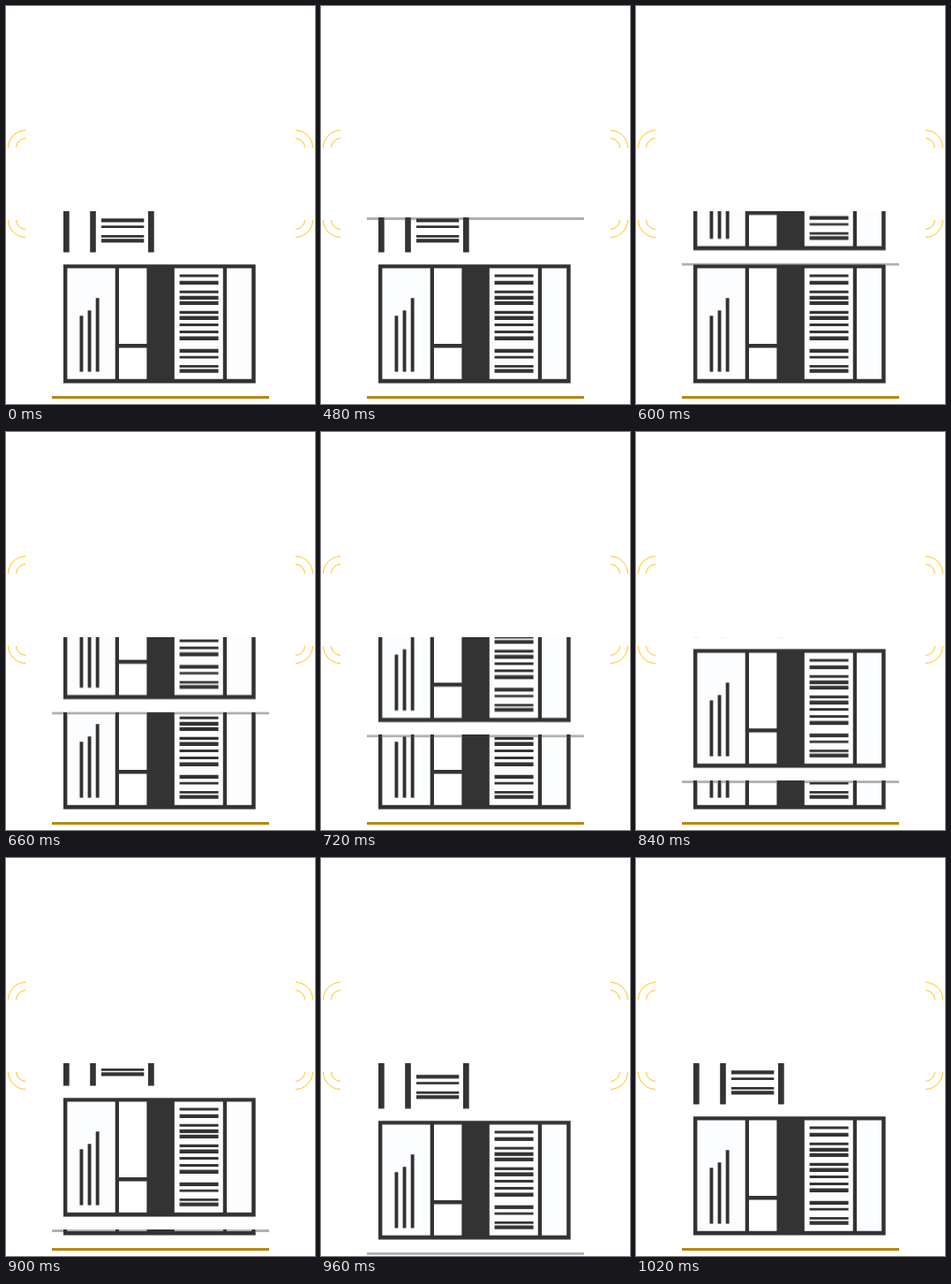
Animation of 350x450 px, one loop 2020 ms. Source, as an HTML page:

```html
<!DOCTYPE html>
<html lang="en">
<head>
<meta charset="utf-8">
<title>Bookcase</title>
<style>
  html, body { margin: 0; width: 100%; height: 100%; overflow: hidden; background: #fff; }
  svg { display: block; width: 350px; height: 450px; }
  .arc { fill: none; stroke: #ffc21a; stroke-width: 1; }
  .ink { fill: #333; }
  .tint { fill: #fcfdff; }
  .edge { fill: #b0b0b0; mix-blend-mode: darken; }
  .slide { animation: slide 2020ms infinite; }

  /* Fixed 30 ms steps, a small overshoot, then out of sight */
  @keyframes slide {
    0% { transform: translateY(-500px); animation-timing-function: step-end; }
    23.76% { transform: translateY(-202px); animation-timing-function: steps(16); }
    47.52% { transform: translateY(4.9px); animation-timing-function: step-end; }
    49.005% { transform: translateY(2px); animation-timing-function: step-end; }
    50.49%, 100% { transform: translateY(-500px); animation-timing-function: step-end; }
  }
</style>
</head>
<body>
<svg viewBox="0 0 350 450">
  <defs>
    <clipPath id="window"><rect x="52" y="232" width="246" height="218"/></clipPath>

    <path id="corner" class="arc" d="M2.5 160A20 20 0 0 1 22 140.5M11.5 160A11 11 0 0 1 22 149.5"/>

    <g id="books">
      <!-- upper row -->
      <path class="ink" d="M65 220h6.7v58.5h-6.7zM95.2 220h6.6v58.5h-6.6zM161 220h6.7v58.5h-6.7z"/>
      <path class="ink" d="M108 240.3h48.3v4.2h-48.3zM108 248.2h48.3v2.8h-48.3zM108 259h48.3v2.8h-48.3zM108 263.3h48.3v4.3h-48.3z"/>
      <!-- lower row -->
      <path class="tint" d="M69 296h55v126h-55zM190 296h56v126h-56zM250 296h29v126h-29z"/>
      <path class="ink" fill-rule="evenodd" d="M65 292.2h217.7v134.2h-217.7zM69.4 296.6v125.2h208.8v-125.2z"/>
      <path class="ink" d="M123.7 294h4.3v130h-4.3zM159.4 294h31.4v130h-31.4zM245.8 294h4.3v130h-4.3zM126 382h35v4.6h-35z"/>
      <path class="ink" d="M83.5 350.3h3.9v63.2h-3.9zM92.6 344.2h3.9v69.3h-3.9zM101.7 330.2h3.9v83.3h-3.9z"/>
      <path class="ink" d="M196.6 303.5h44v2.9h-44zM196.6 310.8h44v4.3h-44zM196.6 321.8h44v2.9h-44zM196.6 327.8h44v4.3h-44zM196.6 333.8h44v4.3h-44z"/>
      <path class="ink" d="M196.6 344.7h44v3.2h-44zM196.6 350.6h44v4.3h-44zM196.6 359h44v2.9h-44zM196.6 367h44v2.9h-44zM196.6 373.6h44v4.3h-44z"/>
      <path class="ink" d="M196.6 387.8h44v4.3h-44zM196.6 395.8h44v2.8h-44zM196.6 406h44v2.8h-44zM196.6 410.4h44v4.4h-44z"/>
    </g>
  </defs>

  <rect width="350" height="450" fill="#fff"/>
  <use href="#corner"/>
  <use href="#corner" transform="matrix(-1 0 0 1 350 0)"/>
  <use href="#corner" transform="matrix(1 0 0 -1 0 402)"/>
  <use href="#corner" transform="rotate(180 175 201)"/>

  <g clip-path="url(#window)">
    <rect x="52" y="232" width="246" height="218" fill="#fff"/>
    <use href="#books"/>
    <rect x="52" y="441" width="246" height="3" fill="#b8860b"/>
    <g class="slide">
      <rect x="52" y="200" width="246" height="241" fill="#fff"/>
      <use href="#books"/>
    </g>
    <rect class="edge slide" x="52" y="441" width="246" height="3"/>
  </g>
</svg>
</body>
</html>
```
